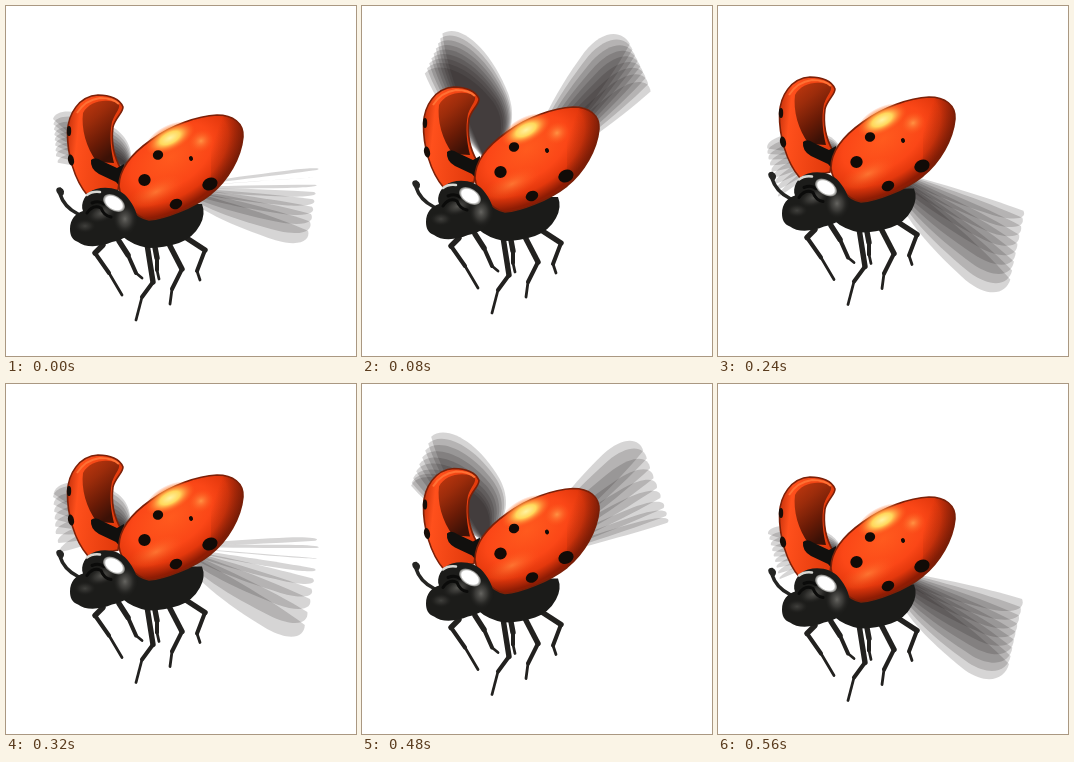
An HTML page for the animation above (0.64 s loop, 350 px wide and 350 px high).

```html
<!DOCTYPE html>
<html lang="en">
<head>
<meta charset="utf-8">
<title>Flying ladybird</title>
<style>
  html, body { margin: 0; width: 100%; height: 100%; overflow: hidden; background: #fff; }
  svg { display: block; width: 350px; height: 350px; }
  .wings path { fill: #1c1717; fill-opacity: .18; }
  .legs path { fill: none; stroke: #22211f; stroke-linejoin: round; stroke-linecap: round; }
  .legs .thigh { stroke-width: 5.4; }
  .legs .shin { stroke-width: 4; }
  .legs .foot { stroke-width: 2.8; }
</style>
</head>
<body>
<svg viewBox="0 0 350 350">
  <defs>
    <radialGradient id="shell" gradientUnits="userSpaceOnUse" cx="166" cy="148" r="82" gradientTransform="rotate(-34 168 152) translate(0 61) scale(1 .6)">
      <stop offset="0" stop-color="#ff5a1e"/>
      <stop offset=".55" stop-color="#fb4717"/>
      <stop offset=".78" stop-color="#e4380d"/>
      <stop offset="1" stop-color="#8e1c04"/>
    </radialGradient>
    <linearGradient id="shade" gradientUnits="userSpaceOnUse" x1="208" y1="134" x2="240" y2="145">
      <stop offset="0" stop-color="#7a2008" stop-opacity="0"/>
      <stop offset="1" stop-color="#6a1c08" stop-opacity=".7"/>
    </linearGradient>
    <radialGradient id="shine">
      <stop offset="0" stop-color="#fff3a0"/>
      <stop offset=".4" stop-color="#ffd85c"/>
      <stop offset=".65" stop-color="#ff8f38" stop-opacity=".8"/>
      <stop offset="1" stop-color="#ff5a1e" stop-opacity="0"/>
    </radialGradient>
    <radialGradient id="gloss">
      <stop offset="0" stop-color="#ff9a48" stop-opacity=".9"/>
      <stop offset="1" stop-color="#ff5a1e" stop-opacity="0"/>
    </radialGradient>
    <linearGradient id="hollow" x1="0" y1="0" x2=".5" y2="1">
      <stop offset="0" stop-color="#c2380f"/>
      <stop offset=".35" stop-color="#9c2c0b"/>
      <stop offset=".7" stop-color="#6a1b06"/>
      <stop offset="1" stop-color="#3c1106"/>
    </linearGradient>
    <linearGradient id="rim" x1="0" y1="0" x2="1" y2=".2">
      <stop offset="0" stop-color="#b82a08"/>
      <stop offset=".25" stop-color="#ff501c"/>
      <stop offset="1" stop-color="#e23a0c"/>
    </linearGradient>
    <radialGradient id="sheen">
      <stop offset="0" stop-color="#666561"/>
      <stop offset=".5" stop-color="#454441" stop-opacity=".7"/>
      <stop offset="1" stop-color="#20201e" stop-opacity="0"/>
    </radialGradient>
    <radialGradient id="glint">
      <stop offset=".75" stop-color="#fff"/>
      <stop offset="1" stop-color="#c5c5c0" stop-opacity=".5"/>
    </radialGradient>
  </defs>

  <g id="fans" class="wings"></g>

  <g id="body">
    <g id="legs" class="legs"></g>
    <path fill="#1b1b19" d="M112 198L196 198Q200 208 194 219Q187 232 173 237Q158 242 142 242Q126 239 116 230Z"/>
  </g>

  <g id="shells">
    <path fill="url(#rim)" stroke="#7c2008" stroke-width="1.6" d="M61.5 126C62 108 73 90 92 89C104 89 114 93 117 101C117 107 109 112 107 121C105 136 108 151 115 163L112 184L82 190C68 174 61 147 61.5 126Z"/>
    <path fill="url(#hollow)" d="M77 107C83 96 98 92 112 97C116 101 109 107 106 116C103 130 105 145 108 157L91 156C80 142 75 122 77 107Z"/>
    <path fill="none" stroke="#ff7134" stroke-width="2" d="M71 107Q79 94 94 92Q107 92 113 98"/>
    <ellipse cx="63" cy="125" rx="2.2" ry="5" fill="#160d08"/>
    <ellipse cx="65" cy="154" rx="3" ry="5.5" fill="#160d08" transform="rotate(-12 65 154)"/>
    <path fill="#11100e" d="M85 154Q89 150 96 155L111 162L118 158L117 184L110 176L93 168Q84 163 85 154Z"/>
    <path id="cover" fill="url(#shell)" stroke="#7c2008" stroke-width="1.6" d="M113 180C113 164 125 148 145 134C166 119 191 110 211 109C227 109 238 117 237 131C235 152 222 174 205 188C187 202 159 213 143 214C130 212 114 194 113 180Z"/>
    <use href="#cover" style="display:none"/>
    <path fill="url(#shade)" d="M205 109C227 107 238 117 237 131C235 152 222 174 205 188Z"/>
    <ellipse cx="164" cy="132" rx="27" ry="13" fill="url(#shine)" transform="rotate(-27 164 132)"/>
    <ellipse cx="150" cy="186" rx="30" ry="13" fill="url(#gloss)" opacity=".6" transform="rotate(-25 150 186)"/>
    <ellipse cx="195" cy="135" rx="13" ry="11" fill="url(#gloss)" transform="rotate(-30 195 135)"/>
    <g id="spots" fill="#120b07"></g>
  </g>

  <g id="head">
    <path fill="none" stroke="#252523" stroke-width="3.6" stroke-linecap="round" d="M72 208C64 204 57 198 54 188Q50 183 54 183Q58 185 55 189"/>
    <path fill="#1c1c1a" d="M64 223C64 213 70 207 77 205C74 198 79 186 90 183C102 180 114 183 121 191C128 199 133 210 131 218C128 227 118 234 106 236C95 241 79 242 72 236C66 234 64 229 64 223Z"/>
    <ellipse cx="119" cy="213" rx="12" ry="15" fill="url(#sheen)"/>
    <ellipse cx="96" cy="207" rx="16" ry="9" fill="url(#sheen)" opacity=".8" transform="rotate(-20 96 207)"/>
    <ellipse cx="79" cy="220" rx="11" ry="7" fill="url(#sheen)" opacity=".5"/>
    <path fill="none" stroke="#0b0b0a" stroke-width="3" stroke-linecap="round" d="M81 207Q87 198 95 202Q98 210 105 211M86 197Q93 194 98 198"/>
    <ellipse cx="108" cy="197" rx="12" ry="7.5" fill="url(#glint)" transform="rotate(32 108 197)"/>
    <path fill="none" stroke="#d8d8d3" stroke-width="2.5" stroke-linecap="round" d="M81 189Q86 185 94 186"/>
  </g>
</svg>
<script>
const STEP = 80, COPIES = 9;
const byId = id => document.getElementById(id);

function add(parent, name, attrs) {
  const node = document.createElementNS('http://www.w3.org/2000/svg', name);
  for (const key in attrs) node.setAttribute(key, attrs[key]);
  return parent.appendChild(node);
}

// x, y, rx, ry
[[152, 149, 5.2, 4.8], [138.5, 174, 6.2, 6], [185, 152.5, 2, 2.4], [204, 178, 7.8, 6.2], [170, 198, 6.4, 5]]
  .forEach(([cx, cy, rx, ry]) => add(byId('spots'), 'ellipse', { cx, cy, rx, ry, transform: `rotate(-22 ${cx} ${cy})` }));

// hip, knee, ankle, toe
[
  [148, 236, 151, 252, 151, 264, 153, 273],
  [113, 235, 122, 249, 130, 267, 136, 272],
  [97, 239, 89, 247, 103, 267, 116, 289],
  [141, 238, 147, 276, 136, 291, 130, 314],
  [162, 236, 176, 263, 166, 283, 164, 298],
  [179, 231, 199, 244, 191, 265, 194, 274]
].forEach(([a, b, c, d, e, f, g, h]) => {
  add(byId('legs'), 'path', { class: 'thigh', d: `M${a} ${b}L${c} ${d}` });
  add(byId('legs'), 'path', { class: 'shin', d: `M${c} ${d}L${e} ${f}` });
  add(byId('legs'), 'path', { class: 'foot', d: `M${e} ${f}L${g} ${h}` });
});

// keys: tip x, tip y and signed bulge, from raised to lowered; belly: where the wing is widest.
const wings = [
  { root: [124, 163], belly: .42, keys: [[82, 24, 43], [66, 60, 41], [50, 97, 34], [47, 113, 26], [50, 150, 16], [62, 195, 6]] },
  { root: [170, 181], belly: .8, keys: [[266, 34, -33], [285, 75, -24], [303, 128, -11], [311, 164, -3], [304, 215, 17], [291, 280, 32]] }
];
wings.forEach(wing => {
  wing.copies = Array.from({ length: COPIES }, () => add(byId('fans'), 'path', {}));
});

// Vertical shift of shells and body, then the part of the stroke swept.
const poses = [
  { shell: 0, body: 0, sweep: [3, 4.15] },
  { shell: -8, body: -7, sweep: [0.1, 1.2] },
  { shell: -15.5, body: -13, sweep: [1.1, 2.8] },
  { shell: -18, body: -15.5, sweep: [3.8, 4.9] },
  { shell: -18, body: -15.5, sweep: [2.8, 4.4] },
  { shell: -12.5, body: -11.5, sweep: [0, 1] },
  { shell: -4.5, body: -3.5, sweep: [0.8, 2.3] },
  { shell: 4, body: 2.5, sweep: [4, 5] }
];

function sample(keys, u) {
  const i = Math.min(Math.floor(u), keys.length - 2);
  return keys[i].map((v, k) => v + (keys[i + 1][k] - v) * (u - i));
}

function wingPath([x, y], belly, [tipX, tipY, bulge]) {
  const dx = tipX - x, dy = tipY - y, length = Math.hypot(dx, dy);
  const at = (along, side) => {
    const w = side * bulge / length;
    return `${(x + dx * along - dy * w).toFixed(1)} ${(y + dy * along + dx * w).toFixed(1)}`;
  };
  return `M${at(0, 0)}C${at(belly * .2, .8)} ${at(belly * .6, 1)} ${at(belly, 1)}` +
    `C${at((belly + 1) / 2 + .08, .95)} ${at(1.04, .45)} ${at(1, 0)}C${at(.7, -.2)} ${at(.3, -.1)} ${at(0, 0)}Z`;
}

let shown = -1;
function draw(index) {
  const { shell, body, sweep: [from, to] } = poses[index];
  const shift = (id, y) => byId(id).setAttribute('transform', `translate(0 ${y})`);
  shift('shells', shell);
  shift('body', body);
  shift('head', body);
  wings.forEach(({ root, belly, keys, copies }) => copies.forEach((copy, i) => {
    const u = from + (to - from) * i / (COPIES - 1);
    copy.setAttribute('d', wingPath([root[0], root[1] + shell], belly, sample(keys, u)));
  }));
}

const start = performance.now();
function tick() {
  const index = Math.floor((performance.now() - start) / STEP) % poses.length;
  if (index !== shown) draw(shown = index);
  requestAnimationFrame(tick);
}
tick();
</script>
</body>
</html>
```
